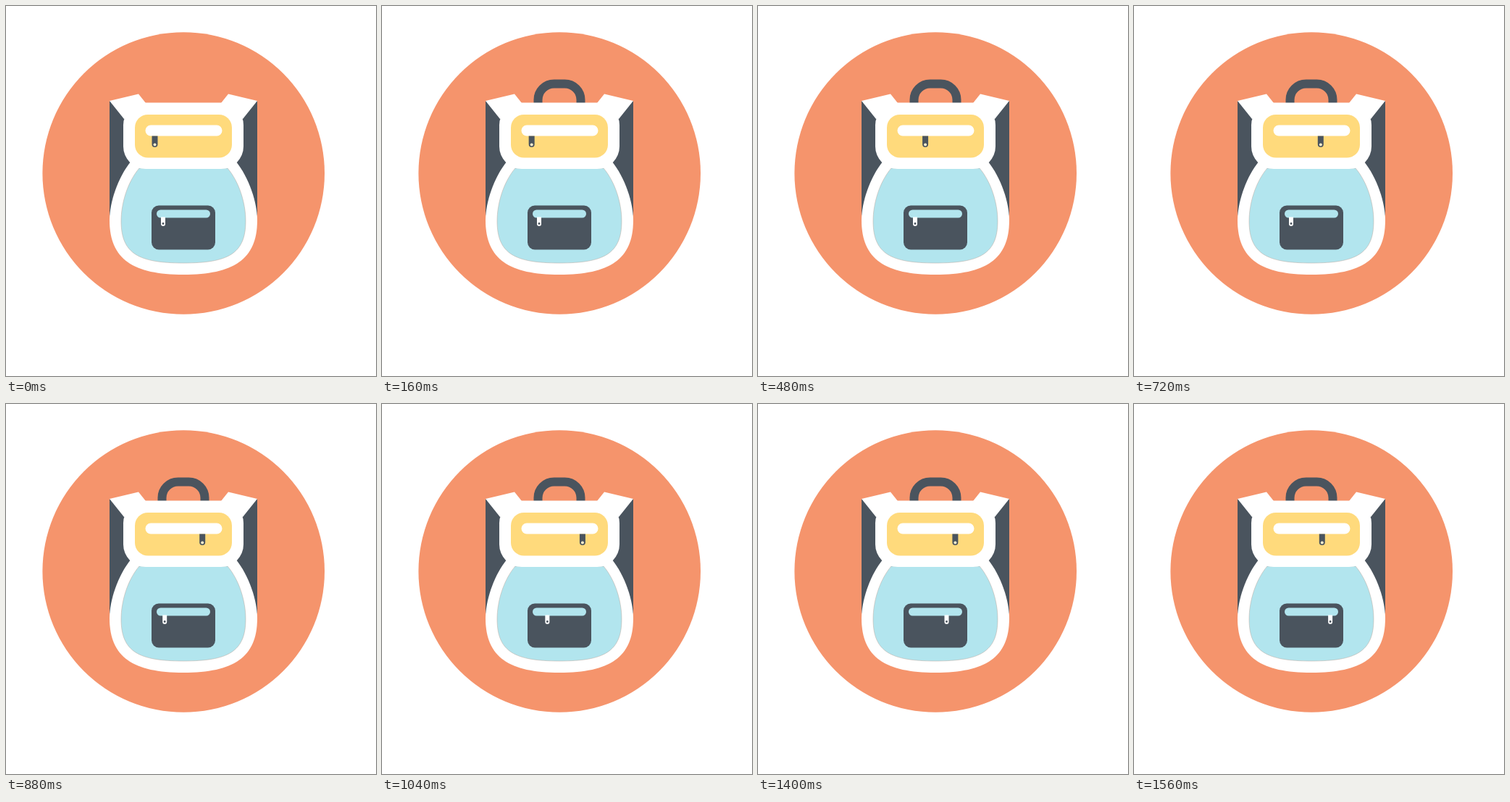
These frames come from a looping animation (511 px wide and 511 px high, 1600 ms). An HTML page:

```html
<!DOCTYPE html>
<html lang="en">
<head>
<meta charset="utf-8">
<title>Backpack</title>
<style>
  html, body { margin: 0; width: 100%; height: 100%; overflow: hidden; background: #fff; }
  svg { display: block; width: 100%; height: 100%; }
  .dark { fill: #4a545e; }
  .white { fill: #fff; }
  .blue { fill: #b2e5ee; }
  .yellow { fill: #ffda7c; }
</style>
</head>
<body>
<svg viewBox="0 0 511 511">
  <defs>
    <g id="strap">
      <path class="dark" d="M143 131L176 150V222L143 290Z"/>
      <path class="white" d="M143 131L183 121.5L193 134L190 150L163 156Z"/>
    </g>
  </defs>
  <circle cx="245.2" cy="231" r="194.8" fill="#f5946c"/>
  <path id="handle" fill="none" stroke="#4a545e" stroke-width="12"
        d="M215.5 145V129.5A22 22 0 0 1 237.5 107.5H252.5A22 22 0 0 1 274.5 129.5V145"/>
  <use href="#strap"/>
  <use href="#strap" transform="matrix(-1 0 0 1 490 0)"/>

  <path class="white" d="M173 214C154 237 143 272 143 296C143 350 176 371 245 371S347 350 347 296C347 272 336 237 317 214Z"/>
  <path class="blue" stroke="#b9a79c" stroke-width=".5"
        d="M184 224C168 243 159 272 159 297C159 342 183 355 245 355S331 342 331 297C331 272 322 243 306 224Z"/>
  <rect class="white" x="162" y="133.5" width="166" height="91.5" rx="31"/>

  <rect class="yellow" x="178" y="150" width="134" height="59.5" rx="18"/>
  <rect class="white" x="192.5" y="164.5" width="106" height="15" rx="7.5"/>
  <g id="upper">
    <path class="dark" d="M-4 179.5H4V191A4 4 0 0 1 -4 191Z"/>
    <circle cy="191.5" r="2" fill="#fff0cc"/>
  </g>

  <rect class="dark" x="201" y="275.5" width="88" height="61" rx="10"/>
  <rect class="blue" x="208" y="281.5" width="74" height="11" rx="5.5"/>
  <g id="lower">
    <path class="white" d="M-3 291.5H3V301A3 3 0 0 1 -3 301Z"/>
    <circle class="dark" cy="300.5" r="1.4"/>
  </g>
</svg>
<script>
  const LOOP = 1600, STEP = 40;
  const [handle, upper, lower] = ['handle', 'upper', 'lower'].map(id => document.getElementById(id));

  const progress = (t, start, span) => Math.min(1, Math.max(0, (t - start) / span));
  const ease = (t, start, span) => (1 - Math.cos(Math.PI * progress(t, start, span))) / 2;
  const move = (el, x, y) => el.setAttribute('transform', `translate(${x} ${y})`);

  function draw(now) {
    let t = Math.floor(now % LOOP / STEP) * STEP;
    if (t < 2 * STEP) t = 0; // the opening pose holds for two steps
    move(handle, 0, 36 * (1 - progress(t, 40, 120)));
    move(upper, 205.5 + 71.5 * (ease(t, 80, 980) - ease(t, 1240, 980)), 0);
    move(lower, 217 + 58 * ease(t, 760, 960), 0);
  }

  let origin;
  function tick(now) {
    origin ??= now;
    draw(now - origin);
    requestAnimationFrame(tick);
  }
  draw(0);
  requestAnimationFrame(tick);
</script>
</body>
</html>
```
